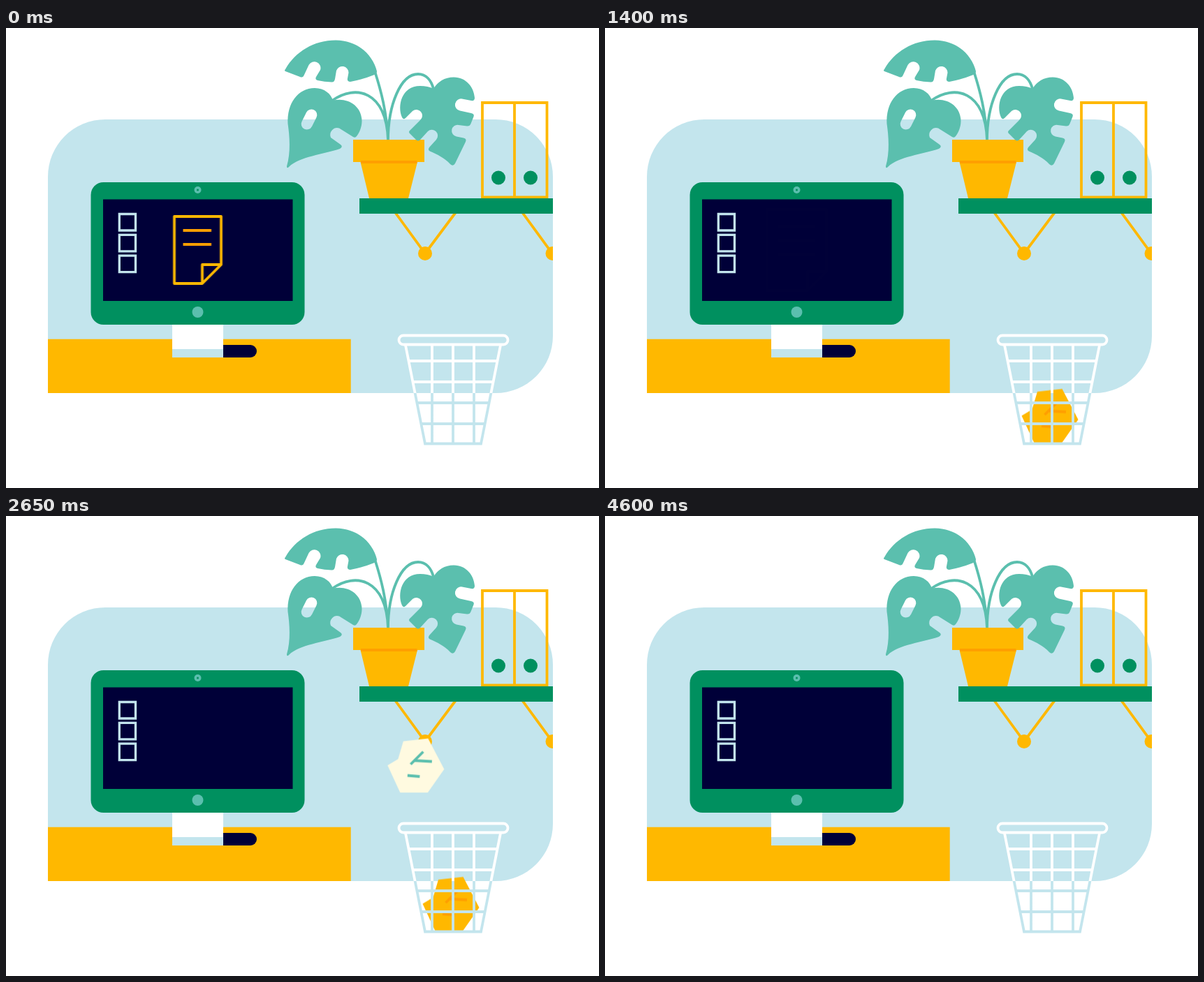
An HTML page that plays this animation: 849 by 659 pixels, repeating every 4.95 s.

```html
<!DOCTYPE html>
<html lang="en">
<head>
<meta charset="utf-8">
<title>Paper toss</title>
<style>
  :root {
    --sky: #c3e5ed; --sun: #ffb800; --amber: #ff9f00;
    --green: #00905f; --teal: #5bbfae; --night: #000038; --cream: #fffae0;
  }
  html, body { margin: 0; width: 100%; height: 100%; overflow: hidden; background: #fff; }
  svg { display: block; width: 849px; height: 659px; }

  .sky { fill: var(--sky); }
  .sun { fill: var(--sun); }
  .green { fill: var(--green); }
  .teal { fill: var(--teal); }
  .night { fill: var(--night); }
  .cream { fill: var(--cream); }
  .line { fill: none; stroke-width: 3.8; }
  .sunline { stroke: var(--sun); }
  .amberline { stroke: var(--amber); }
  .skyline { stroke: var(--sky); }
  .tealline { stroke: var(--teal); }
  .creamline { stroke: var(--cream); }
  .page { stroke-linejoin: round; }

  /* One shared 4.95 s loop */
  .x1, .y1, .x2, .y2, .show, .shrink1, .shrink2, .burst { animation: 4.95s linear infinite; }
  .x1 { animation-name: x1; }
  .y1 { animation-name: y1; }
  .x2 { animation-name: x2; }
  .y2 { animation-name: y2; }
  .show { animation-name: show; }
  .shrink1 { animation-name: shrink1; }
  .shrink2 { animation-name: shrink2; }
  .burst { fill: none; stroke-width: 4; stroke-dasharray: 24 200; stroke-dashoffset: 24; }
  .b1 { animation-name: burst1; }
  .b2 { animation-name: burst2; }

  /* Sideways: the page speeds up (t cubed), leaves as a ball, then meets the bin wall */
  @keyframes x1 {
    0% { transform: translateX(0); }
    1.616% { transform: translateX(0); animation-timing-function: cubic-bezier(.333, 0, .667, 0); }
    20.202% { transform: translateX(338.5px); animation-timing-function: cubic-bezier(.333, .667, .667, 1); }
    22.222% { transform: translateX(397px); animation-timing-function: ease-in-out; }
    25.253%, 100% { transform: translateX(362.5px); }
  }
  @keyframes x2 {
    0% { transform: translateX(0); }
    33.596% { transform: translateX(0); animation-timing-function: cubic-bezier(.333, 0, .667, 0); }
    53.535% { transform: translateX(311px); animation-timing-function: cubic-bezier(.333, .667, .667, 1); }
    55.556% { transform: translateX(375px); animation-timing-function: ease-in-out; }
    58.586%, 100% { transform: translateX(344.5px); }
  }
  /* Downwards: gravity (t squared) and one small bounce */
  @keyframes y1 {
    0% { transform: translateY(0); }
    17.556% { transform: translateY(0); animation-timing-function: cubic-bezier(.333, 0, .667, .333); }
    23.717% { transform: translateY(237.5px); animation-timing-function: cubic-bezier(.333, .667, .667, 1); }
    25.333% { transform: translateY(225px); animation-timing-function: cubic-bezier(.333, 0, .667, .333); }
    26.949%, 100% { transform: translateY(237.5px); }
  }
  @keyframes y2 {
    0% { transform: translateY(0); }
    51.051% { transform: translateY(0); animation-timing-function: cubic-bezier(.333, 0, .667, .333); }
    56.162% { transform: translateY(163.5px); animation-timing-function: cubic-bezier(.333, .667, .667, 1); }
    57.778% { transform: translateY(151px); animation-timing-function: cubic-bezier(.333, 0, .667, .333); }
    59.394%, 100% { transform: translateY(163.5px); }
  }
  @keyframes show {
    0%, 28.283% { opacity: 0; }
    31.313%, 100% { opacity: 1; }
  }
  @keyframes shrink2 {
    0%, 75.556% { transform: scale(1); }
    78.788%, 100% { transform: scale(0); }
  }
  @keyframes shrink1 {
    0%, 86.263% { transform: scale(1); }
    88.889%, 100% { transform: scale(0); }
  }
  @keyframes burst2 {
    0% { stroke-dashoffset: 24; }
    76.768% { stroke-dashoffset: 24; animation-timing-function: ease-out; }
    84.04%, 100% { stroke-dashoffset: -76; }
  }
  @keyframes burst1 {
    0% { stroke-dashoffset: 24; }
    87.273% { stroke-dashoffset: 24; animation-timing-function: ease-out; }
    92.727%, 100% { stroke-dashoffset: -76; }
  }
</style>
</head>
<body>
<svg viewBox="0 0 849 659">
  <defs>
    <clipPath id="room"><rect width="783" height="659"/></clipPath>
    <clipPath id="screen"><rect x="139" y="245.5" width="271.5" height="145.5"/></clipPath>
    <linearGradient id="wire" gradientUnits="userSpaceOnUse" x1="0" y1="0" x2="0" y2="523">
      <stop offset="1" stop-color="#fff"/>
      <stop offset="1" stop-color="#c3e5ed"/>
    </linearGradient>
    <path id="ball" d="M-18-34.5 17.5-38.5 40.5 5.5 17 39H-22.5L-40.5 0-25.5-9Z"/>
    <path id="creases" d="M-7.5-1.5 10.5-19.5M-3-7 23-5.5M-12 14.5 5.5 16"/>
    <path id="rays" d="M25 0H101M-25 0H-101M0 25V101M0-25V-101M18 18 71 71M-18 18-71 71M18-18 71-71M-18-18-71-71"/>
  </defs>

  <!-- Wall and desk -->
  <path class="sky" d="M60 523V213A82 82 0 0 1 142 131H701A82 82 0 0 1 783 213V441A82 82 0 0 1 701 523Z"/>
  <rect class="sun" x="60" y="445.7" width="433.7" height="77.3"/>

  <!-- Shelf -->
  <g clip-path="url(#room)">
    <path class="line sunline" d="M557 264 600 323 644 264M739 264 782 323"/>
    <circle class="sun" cx="600" cy="323" r="10"/>
    <circle class="sun" cx="782.5" cy="323" r="10"/>
    <path class="line sunline" d="M682 107H774.5V242.500H682ZM728 107V242.500"/>
    <circle class="green" cx="705" cy="214.5" r="10"/>
    <circle class="green" cx="751" cy="214.5" r="10"/>
    <rect class="green" x="506" y="244" width="277" height="22"/>
  </g>

  <!-- Plant -->
  <path class="line tealline" d="M528 62C537 90 545 120 547 161M467 104C500 80 545 90 547 161C547 110 565 66 590 66C602 66 609 76 612 87"/>
  <path class="sun" d="M497 160H599V192H589L576 244H520L507.5 192H497Z"/>
  <path class="line amberline" d="M508 192H588.5"/>
  <g class="teal">
    <path d="M400 59C414 34 441 17.5 472 17.5C503 17.5 525 38 531 62Q531 66 526 67.500Q510 74 493 77Q488 77 489 72L490.500 64A9 9 0 0 0 473 61L471 73Q470 78 466 77.500Q456 77 446 75Q442 74 444 70L450 60A9 9 0 0 0 433.500 53L427 67Q425 72 421 70L400 62Q398 61 400 59Z"/>
    <path fill-rule="evenodd" d="M402 198C408 178 406 155 403.500 137C402 108 418 86 442 86C456 86 466 95 468 104C487 99 509 110 509.500 133C509.500 142 506 150 502 155Q500 158 497 156L477 143.500A10 10 0 0 0 465 157L479 167Q483 170 478 173C455 181 420 184 405 199Q402 202 402 198ZM430 121A8 8 0 0 1 444.500 128L438 141A8 8 0 0 1 423.500 134Z"/>
    <path d="M612 87C618 77 628 70.500 641 70.500C659 70.500 670 85 671 100Q671 105 666 104L653 101.500A8.500 8.500 0 0 0 650 118.500L666 122Q671 123 669.500 127L665.500 137Q664 141 660 140.500L648 139A8 8 0 0 0 645 155.500L655 157.500Q660 158.500 658 163L643 194Q640 199 636 195C628 186 617 181 608 177Q603 175 606 171L616 160A8.500 8.500 0 0 0 604 148L593 160Q590 163 587 160L579 152Q575 149 579 146L593 132A8.500 8.500 0 0 0 582 119L572 129Q569 132 567 128C560 112 566 83 593 83Q604 83 612 87Z"/>
  </g>

  <!-- Paper balls, waiting behind the monitor -->
  <g transform="translate(274.5 318)">
    <g class="x1"><g class="y1">
      <g class="shrink1">
        <use href="#ball" class="sun"/>
        <use href="#creases" class="line amberline"/>
      </g>
      <use href="#rays" class="burst b1 sunline"/>
    </g></g>
    <g class="x2"><g class="y2">
      <g class="shrink2">
        <use href="#ball" class="cream"/>
        <use href="#creases" class="line tealline"/>
      </g>
      <use href="#rays" class="burst b2 creamline"/>
    </g></g>
  </g>

  <!-- Bin -->
  <g class="line" stroke="url(#wire)">
    <rect x="562.5" y="440.5" width="156" height="13" rx="6.5"/>
    <path d="M572 454.5 600 595.5H680L708 454.5M610 454.5V595.5M640 454.5V595.5M670 454.5V595.5M576.5 477H703.5M582.5 507H697.5M588.5 537H691.5M594.5 567H685.5"/>
  </g>

  <!-- Monitor -->
  <rect class="night" x="292" y="454" width="67" height="18" rx="9"/>
  <rect x="238" y="424" width="73" height="36" fill="#fff"/>
  <rect class="sky" x="238" y="460" width="73" height="12"/>
  <rect class="green" x="121.5" y="221" width="306" height="204" rx="18"/>
  <circle class="teal" cx="274.5" cy="232" r="5"/>
  <circle class="green" cx="274.5" cy="232" r="1.5"/>
  <circle class="teal" cx="274.5" cy="407" r="8"/>
  <rect class="night" x="139" y="245.5" width="271.5" height="145.5"/>
  <path class="line skyline" style="stroke-width:3.3" d="M162.3 266.5h23.2v23.500h-23.2zM162.3 296.3h23.2v23.500h-23.2zM162.3 326.2h23.2v23.500h-23.2z"/>

  <!-- Pages -->
  <g clip-path="url(#screen)">
    <g transform="translate(274.5 318)">
      <g class="x1 line page">
        <path class="sunline" d="M-33.5-48H33.5V21L6.5 48H-33.5ZM6.5 48V21H33.5"/>
        <path class="amberline" d="M-21-28H19.5M-21-8H19.5"/>
      </g>
      <g class="x2 line page">
        <g class="show">
          <path stroke="#fff" d="M-42.5-58H42.5V31L15.5 58H-42.5ZM15.5 58V31H42.5"/>
          <path class="skyline" d="M-27-34H26.5M-27-14H26.5M-27 6H26.5"/>
        </g>
      </g>
    </g>
  </g>
</svg>
</body>
</html>
```
